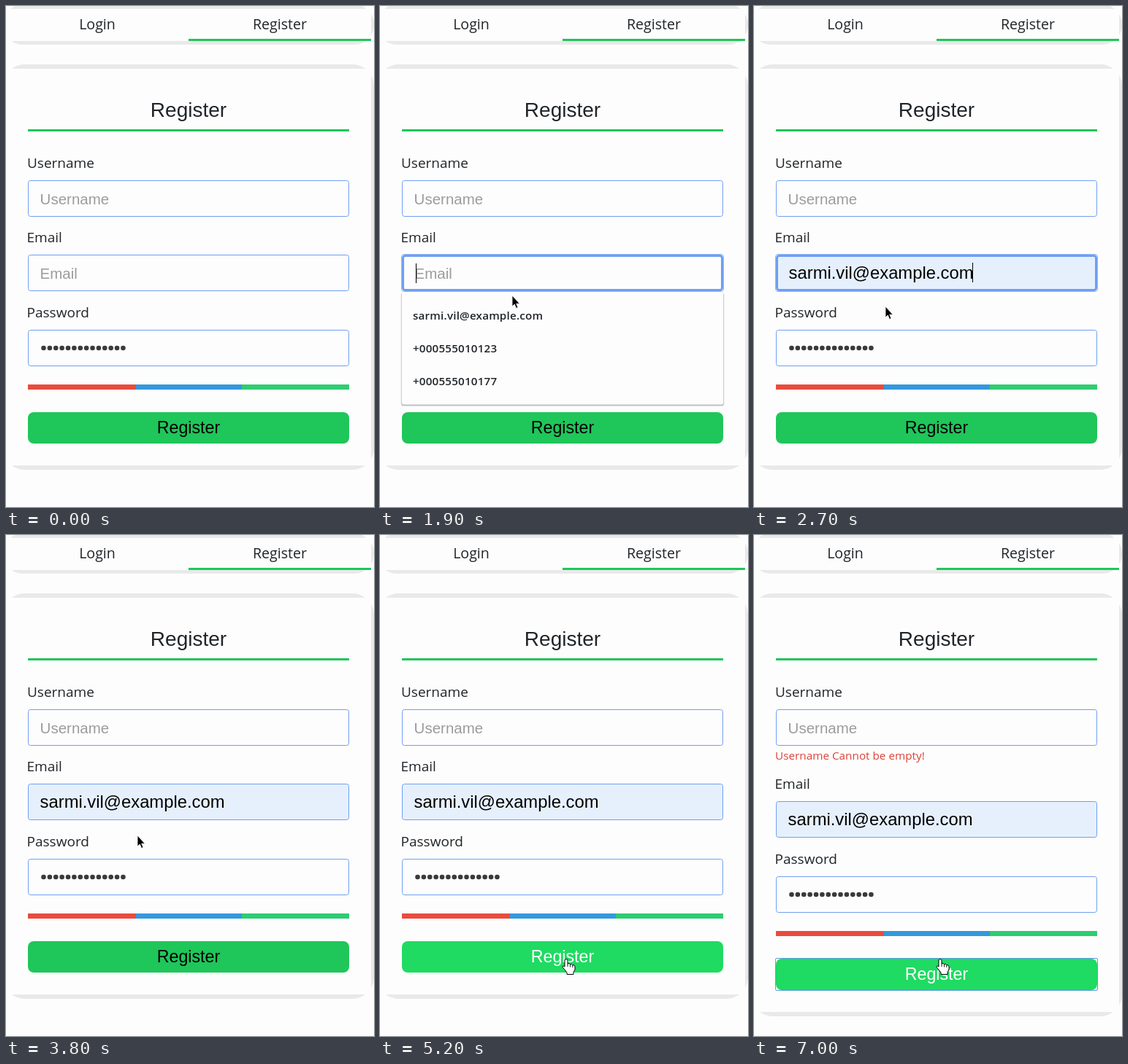
An HTML page for the animation above (8 s loop, 504 by 687 pixels).

```html
<!DOCTYPE html>
<html lang="en">
<head>
<meta charset="utf-8">
<title>Register form</title>
<style>
  html, body { margin: 0; height: 100%; overflow: hidden; background: #fdfdfd; }
  svg { display: block; width: 504px; height: 687px; }
  text { font-family: "Open Sans", "Noto Sans", sans-serif; font-size: 19px; fill: #212529; white-space: pre; }
  .arial { font-family: "Liberation Sans", Arial, sans-serif; }
  .hint { font-size: 20.5px; fill: #9c9c9c; }
  .value { font-size: 23.8px; fill: #000; }
  .preview { font-size: 16.7px; fill: #000; }
  .tab { font-size: 19.6px; text-anchor: middle; }
  .option { font-size: 15.2px; font-weight: 600; letter-spacing: .2px; }
  .input { fill: #fdfdfd; stroke: #6f9ff2; }
  .shade { fill: #e9e9e9; }
  .paper { fill: #fdfdfd; }
  .green { fill: #1fc65a; }
</style>
</head>
<body>
<svg viewBox="0 0 504 687">
  <rect class="shade" x="-4" y="-2" width="508" height="55" rx="27"/>
  <rect class="paper" y="4" width="500" height="44"/>
  <text class="tab" x="125" y="32">Login</text>
  <text class="tab" x="375" y="32">Register</text>
  <rect class="green" x="250" y="45" width="250" height="3"/>

  <rect id="cardShade" class="shade" x="-4" y="80" width="508" height="556" rx="30"/>
  <rect id="card" class="paper" y="86" width="500" height="544"/>
  <text class="arial" x="250" y="152" text-anchor="middle" style="font-size:28px">Register</text>
  <rect class="green" x="30" y="169" width="440" height="3"/>

  <text x="29" y="222">Username</text>
  <rect class="input" x="30.5" y="239.5" width="439" height="49" rx="3"/>
  <text class="arial hint" x="46.6" y="272">Username</text>
  <text id="error" x="29" y="308" style="font-size:15.3px;fill:#dc4238">Username Cannot be empty!</text>

  <g id="lower">
    <text x="28.5" y="324">Email</text>
    <rect id="ring" x="29.5" y="340.5" width="441" height="51" rx="3.5" fill="none" stroke="#8fb5f6"/>
    <rect id="email" class="input" rx="3"/>
    <text id="emailText" class="arial"></text>
    <rect id="caret" width="1" height="27"/>

    <text x="28.5" y="427">Password</text>
    <rect class="input" x="30.5" y="444.5" width="439" height="49" rx="3"/>
    <path d="M51.5 469H161" stroke="#3a3a3a" stroke-width="6.6" stroke-linecap="round" stroke-dasharray="0 8.38"/>
    <path d="M30 522.5h148" stroke="#e84c3d" stroke-width="7"/>
    <path d="M178 522.5h145" stroke="#3498db" stroke-width="7"/>
    <path d="M323 522.5h147" stroke="#2ecc71" stroke-width="7"/>

    <rect id="button" x="30" y="557" width="440" height="43" rx="8"/>
    <rect id="outline" x="29.5" y="556.5" width="441" height="44" rx="1.5" fill="none" stroke="#5f9be8"/>
    <text id="buttonText" class="arial" x="250" y="586" text-anchor="middle" style="font-size:23.2px">Register</text>
  </g>

  <g id="menu">
    <rect x="28.5" y="393" width="443" height="156" rx="3" fill="#e4e4e4"/>
    <rect x="29.5" y="393" width="441" height="155" rx="3" fill="#bdbdbd"/>
    <rect class="paper" x="30" y="392" width="440" height="154.5" rx="3"/>
    <rect id="row" x="30" y="402" width="440" height="45" fill="#c8c8c8"/>
    <text class="option" x="45" y="430">sarmi.vil@example.com</text>
    <text class="option" x="45" y="475">+000555010123</text>
    <text class="option" x="45" y="520">+000555010177</text>
  </g>

  <g id="pointer" stroke-linejoin="round">
    <path id="arrow" d="M0 0V15L3.3 12 5.6 17.5 8 16.4 5.7 11.2H10.3Z" fill="#000" stroke="#fff" stroke-width=".8"/>
    <path id="beam" d="M-3 -7.5h2.5l1 1 1-1H4M.5 -7V7M-3 7.5h2.5l1-1 1 1H4" fill="none" stroke="#000"/>
    <g id="hand" stroke="#000">
      <path d="M-2 1.5Q0 -.8 2 1.5V7Q4 5.6 5.5 7.6 7.8 6.6 8.8 8.6 11.5 8 12 10.8V15L10 18.5V21.5H1V19L-2.5 14.5-5 11.5Q-5.2 9-2 11Z" fill="#fff"/>
      <path d="M2 7v4M5.5 8v3.5M8.8 9v3" fill="none" stroke-width=".9"/>
    </g>
  </g>
</svg>
<script>
const LOOP = 8000, STEP = 100, ADDRESS = "sarmi.vil@example.com";
const el = id => document.getElementById(id);
const set = (id, attrs) => { for (const k in attrs) el(id).setAttribute(k, attrs[k]); };
const show = (id, on) => { el(id).style.display = on ? "" : "none"; };
const clamp = v => Math.max(0, Math.min(1, v));
const mix = (a, b, p) => a + (b - a) * p;
const rgb = (a, b, p) => `rgb(${a.map((v, i) => Math.round(mix(v, b[i], p)))})`;

// Pointer stops: start time, end time, destination
const moves = [
  [200, 1000, 183, 378],
  [1800, 2100, 180, 412],
  [4500, 5200, 255, 581],
];

function pointerAt(t) {
  let x = 215, y = -12;
  for (const [from, to, endX, endY] of moves) {
    const p = clamp((t - from) / (to - from)), eased = p * (2 - p);
    x = mix(x, endX, eased);
    y = mix(y, endY, eased);
  }
  return [Math.round(x), Math.round(y)];
}

function pointerShape(y, menuOpen) {
  if (y < 48 || y >= 557) return "hand";
  const inputs = menuOpen ? [341] : [239, 341, 444];
  return inputs.some(top => y >= top && y < top + 50) ? "beam" : "arrow";
}

function drawEmail(t, menuOpen, hovering) {
  const focus = clamp((t - 1000) / 200) - clamp((t - 3600) / 200);
  const width = 1 + 2 * focus, filled = t >= 2600;
  set("email", {
    x: 30 + width / 2, y: 341 + width / 2, width: 440 - width, height: 50 - width,
    "stroke-width": width,
  });
  el("email").style.fill = hovering || filled ? "#e6f0fd" : "";
  show("ring", t >= 1600 && t < 3700);

  const text = el("emailText");
  text.textContent = hovering || filled ? ADDRESS : "Email";
  text.setAttribute("class", "arial " + (filled ? "value" : hovering ? "preview" : "hint"));
  set("emailText", { x: hovering ? 48.6 : 46.6 + (focus > 0 ? 1 : 0), y: 374 });

  show("caret", menuOpen || (filled && t < 3300));
  set("caret", menuOpen ? { x: 49, y: 353 } : { x: 299, y: 352 });
}

function draw(t) {
  const [x, y] = pointerAt(t);
  const menuOpen = t >= 1600 && t < 2600;
  const hovering = menuOpen && y >= 402;
  const shift = t >= 7000 ? 24 : 0;

  show("menu", menuOpen);
  show("row", hovering);
  drawEmail(t, menuOpen, hovering);

  const hover = clamp((t - 4800) / 400);
  el("button").style.fill = rgb([31, 198, 90], [31, 219, 98], hover);
  el("buttonText").style.fill = rgb([0, 0, 0], [255, 255, 255], hover);
  show("outline", t >= 6800);

  show("error", shift);
  set("lower", { transform: `translate(0 ${shift})` });
  set("cardShade", { height: 556 + shift });
  set("card", { height: 544 + shift });

  show("pointer", t >= 300);
  set("pointer", { transform: `translate(${x} ${y})` });
  const shape = pointerShape(y, menuOpen);
  for (const id of ["arrow", "beam", "hand"]) show(id, id === shape);
}

const start = performance.now();
function tick() {
  const t = (performance.now() - start) % LOOP;
  draw(Math.floor(t / STEP) * STEP);
  requestAnimationFrame(tick);
}
tick();
</script>
</body>
</html>
```
